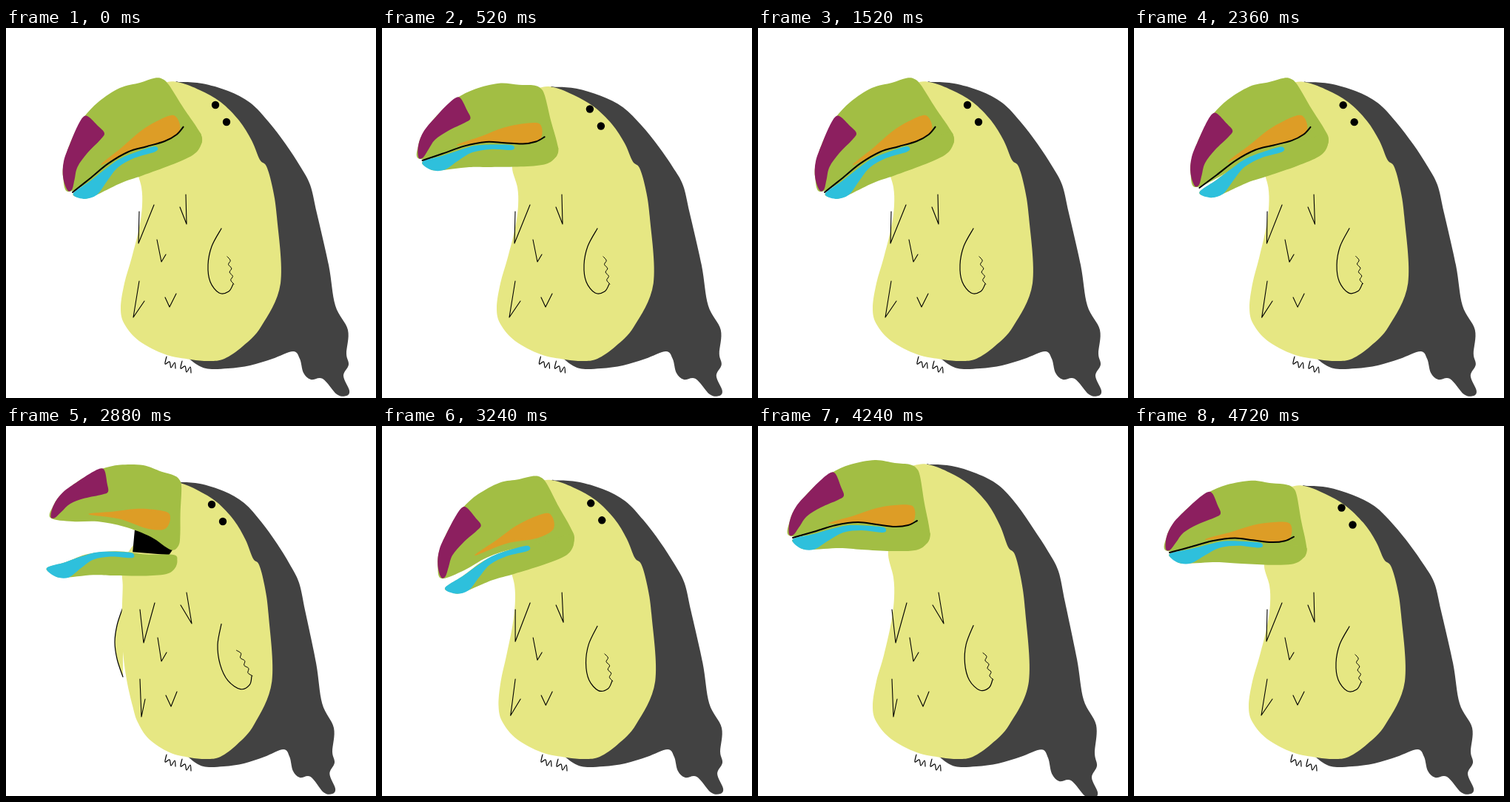
Recreate the animation shown at these times as an HTML page with a canvas. Size 500 by 500 pixels, loop 4.76 s.

```html
<!DOCTYPE html>
<html lang="en">
<head>
<meta charset="utf-8">
<title>Toucan</title>
<style>
html, body { margin: 0; width: 100%; height: 100%; overflow: hidden; background: #fff; }
canvas { display: block; width: 500px; height: 500px; }
</style>
</head>
<body>
<canvas id="stage" width="500" height="500"></canvas>
<script>
const ctx = document.getElementById('stage').getContext('2d');
const LOOP = 4760, CYCLE = 3360, STEP = 40;
const GREY = '#424242', YELLOW = '#e6e783', GREEN = '#a2be44';
const PURPLE = '#8c1f5f', ORANGE = '#dd9d26', CYAN = '#2ec0dc', BLACK = '#000';

const clamp = v => Math.max(0, Math.min(1, v));
const range = (n, fn) => Array.from({ length: n }, (_, i) => fn(i));
const shift = (dx, dy) => ([x, y]) => [x + dx, y + dy];

// Resting body; every other stance is a warp of it
const back = [[205,82],[218,73],[236,74],[262,84],[290,100],[315,125],[332,152],[343,178],[352,187],
  [360,215],[366,255],[371,345],[345,403],[320,430],[295,447],[275,450],[250,448]];
const front = [[215,441],[180,423],[160,400],[155,378],[160,345],[170,310],[180,270],[184,240],
  [183,215],[176,188],[180,165],[195,130]];
const coat = [[236,73],[265,75],[300,85],[330,101],[355,127],[378,157],[397,186],[411,212],[420,250],
  [436,320],[445,375],[462,408],[460,440],[463,455],[456,470],[464,490],[460,497],[447,495],
  [428,474],[412,475],[402,466],[397,447],[388,437],[360,447],[330,456],[300,460],[270,460],
  [250,449],[240,435],[240,400],[240,300],[225,110],[228,76]];

// Closed beak with the head raised: parts of each half
const upperHalf = {
  upper: [[42,148],[43,128],[50,112],[66,92],[84,75],[100,63],[125,52],[158,46],[185,50],[205,52],
    [214,57],[219,68],[225,105],[231,135],[232,152],[222,160],[190,147],[150,140],[110,140],[75,147]],
  purple: [[42,146],[43,128],[52,108],[70,88],[85,73],[98,63],[105,65],[112,82],[116,94],[108,100],
    [85,110],[66,122],[56,136],[48,147]],
  orange: [[95,132],[130,121],[160,111],[185,107],[206,107],[212,114],[211,127],[203,134],[180,136],[140,130]],
  lips: [[47,151],[75,143],[105,134],[135,130],[160,133],[185,136],[203,134],[215,128]],
  palate: [[165,140],[228,152]]
};
const lowerHalf = {
  lower: [[47,153],[75,146],[110,136],[150,134],[190,140],[228,142],[232,150],[226,161],[212,168],
    [180,169],[140,167],[110,165],[66,167],[54,162]],
  cyan: [[47,153],[75,146],[100,139],[125,134],[165,136],[173,140],[168,144],[140,141],[115,144],
    [95,155],[75,167],[57,165]],
  tongue: [[222,142],[172,136]]
};

// Linear map about a point, which lands on another point
const swing = (from, to, a, b, c, d) => ([x, y]) => {
  const dx = x - from[0], dy = y - from[1];
  return [to[0] + a * dx + b * dy, to[1] + c * dx + d * dy];
};
const same = p => p;
const tilted = swing([47,151], [90,222], .944, .39, -.4, .92);
const levelled = swing([47,151], [48,171], 1, 0, 0, .927);
const gapeUp = swing([42,148], [60,124], .915, -.19, .18, .9);
const gapeDown = swing([47,153], [55,192], .957, .2, -.04, .983);

const warps = {
  rest: same,
  sway: ([x, y]) => [x - 2 * clamp((x - 200) / 200), y + 2 * clamp((x - 350) / 100)],
  level: ([x, y]) => [x - 5 * clamp((x - 200) / 100), y + 8 * clamp((220 - y) / 130)],
  raised: ([x, y]) => {
    const tail = clamp((x - 380) / 30);
    return [x - 5 * clamp((x - 200) / 100),
      y - 21 * clamp((310 - y) / 190) + tail * (10 * clamp((y - 400) / 60) - 5)];
  },
  open: ([x, y]) => [x - 19 * clamp((x - 230) / 230), y + 3 * clamp((200 - y) / 100)]
};
// An open beak pushes the chest out and pulls the belly in
const puff = ([x, y]) => {
  const d = y - 338;
  return [x + (d < 0 ? 27 * Math.sin(d * Math.PI / 200) : 18 * Math.sin(d * Math.PI / 115)), y];
};

const wing = [[291,271],[278,295],[273,320],[276,343],[288,358],[301,356],[307,346]];
const wingTips = range(8, i => [307 - .8 * i + (i % 2 ? -2.5 : 1), 346 - 5.3 * i]);
const fan = s => ([x, y]) => [x + s * (y - 271) / 3, y - s * .3 * (x - 280)];

const plumes = [
  { pts: [[180,248],[179,291],[200,239]], flex: 7 },
  { pts: [[235,242],[244,265],[243,225]], flex: 7 },
  { pts: [[204,286],[210,316],[216,306]], flex: 0 },
  { pts: [[180,342],[172,391],[187,369]], flex: 11 },
  { pts: [[215,364],[221,377],[230,359]], flex: 2 }
];
const toes = [[0,0],[-2,10],[4,7],[6,15],[11,8],[12,16]];

function pose({ warp, up = same, down = up, spread = 0, lift = 0, look = [0, 0], step = 0 }) {
  const open = warp === 'open', bend = warps[warp];
  const parts = {
    coat: coat.map(bend),
    body: [...back.map(bend), ...front.map(open ? puff : bend)],
    farWing: range(5, i => [158 - 11 * Math.sin(i * Math.PI / 4) + (open ? 0 : 34), 245 + 23.5 * i]),
    wing: wing.map(fan(spread)),
    wingTips: wingTips.map(fan(spread)),
    eyes: [[283,104],[298,127]].map(shift(...look)),
    leftFoot: toes.map(shift(217 + step, 444)),
    rightFoot: toes.map(shift(238 + step, 450))
  };
  for (const key in upperHalf) parts[key] = upperHalf[key].map(up);
  for (const key in lowerHalf) parts[key] = lowerHalf[key].map(down);
  plumes.forEach(({ pts, flex }, n) => {
    parts['plume' + n] = pts.map(([x, y], i) => i === 1 ? [x + flex * lift, y + 2 * lift] : [x + lift, y]);
  });
  return parts;
}

const rest = pose({ warp: 'rest', up: tilted });
const sway = pose({ warp: 'sway', up: tilted, spread: .2, lift: .5 });
const levelStance = { warp: 'level', up: levelled, look: [-2.5, 6.5], step: -3 };
const level = pose(levelStance);
const settling = pose({ ...levelStance, spread: .3, lift: .8 });
const raised = pose({ warp: 'raised', spread: .4, lift: 1, look: [-6, -19], step: -3 });
const open = pose({ warp: 'open', up: gapeUp, down: gapeDown, spread: 1, lift: 1, look: [-5, 2] });

const keys = [[0, rest], [180, sway], [360, rest], [400, rest], [560, level], [600, level],
  [880, raised], [1160, settling], [1360, level], [1520, rest], [1600, rest], [1920, sway],
  [2240, rest], [2280, rest], [2800, open], [2880, open], [CYCLE, rest]];
const BLINK = [800, 960];

function bird(t) {
  const i = keys.findIndex(([end]) => t < end);
  const [t0, a] = keys[i - 1], [t1, b] = keys[i];
  const k = (t - t0) / (t1 - t0), e = k * k * (3 - 2 * k);
  const parts = {};
  for (const key in a) {
    parts[key] = a[key].map(([x, y], n) => [x + (b[key][n][0] - x) * e, y + (b[key][n][1] - y) * e]);
  }
  const gape = (a === open ? 1 - e : 0) + (b === open ? e : 0);
  return { parts, gape };
}

// Catmull-Rom spline through the points
function curve(pts, closed) {
  const n = pts.length;
  const at = i => closed ? pts[(i + n) % n] : pts[Math.max(0, Math.min(n - 1, i))];
  ctx.beginPath();
  ctx.moveTo(...pts[0]);
  for (let i = 0; i < (closed ? n : n - 1); i++) {
    const [p, q, r, s] = [at(i - 1), at(i), at(i + 1), at(i + 2)];
    ctx.bezierCurveTo(q[0] + (r[0] - p[0]) / 6, q[1] + (r[1] - p[1]) / 6,
      r[0] - (s[0] - q[0]) / 6, r[1] - (s[1] - q[1]) / 6, r[0], r[1]);
  }
}
function blob(pts, color) {
  curve(pts, true);
  ctx.fillStyle = color;
  ctx.fill();
}
function poly(pts) {
  ctx.beginPath();
  pts.forEach(p => ctx.lineTo(...p));
}
function ink(width) {
  ctx.lineWidth = width;
  ctx.strokeStyle = BLACK;
  ctx.stroke();
}

function draw(t) {
  const { parts, gape } = bird(t);
  ctx.fillStyle = '#fff';
  ctx.fillRect(0, 0, 500, 500);
  ctx.lineCap = ctx.lineJoin = 'round';

  blob(parts.coat, GREY);
  curve(parts.farWing);
  ctx.fillStyle = YELLOW;
  ctx.fill();
  ink(1.2);
  blob(parts.body, YELLOW);

  poly([...parts.palate, ...parts.tongue]);
  ctx.fillStyle = BLACK;
  ctx.fill();
  blob(parts.upper, GREEN);
  blob(parts.lower, GREEN);
  blob(parts.cyan, CYAN);
  blob(parts.purple, PURPLE);
  blob(parts.orange, ORANGE);
  if (gape < .1) {
    curve(parts.lips);
    ink(2);
  }

  if (t < BLINK[0] || t >= BLINK[1]) {
    ctx.fillStyle = BLACK;
    for (const [x, y] of parts.eyes) {
      ctx.beginPath();
      ctx.arc(x, y, 5.2, 0, Math.PI * 2);
      ctx.fill();
    }
  }

  curve(parts.wing);
  ink(1.2);
  curve(parts.wingTips);
  ink(1);
  plumes.forEach((_, n) => {
    poly(parts['plume' + n]);
    ink(1.1);
  });
  for (const foot of [parts.leftFoot, parts.rightFoot]) {
    curve(foot);
    ink(1.2);
  }
}

const start = performance.now();
function tick() {
  const t = (performance.now() - start) % LOOP;
  draw(Math.floor(t / STEP) * STEP % CYCLE);
  requestAnimationFrame(tick);
}
tick();
</script>
</body>
</html>
```
